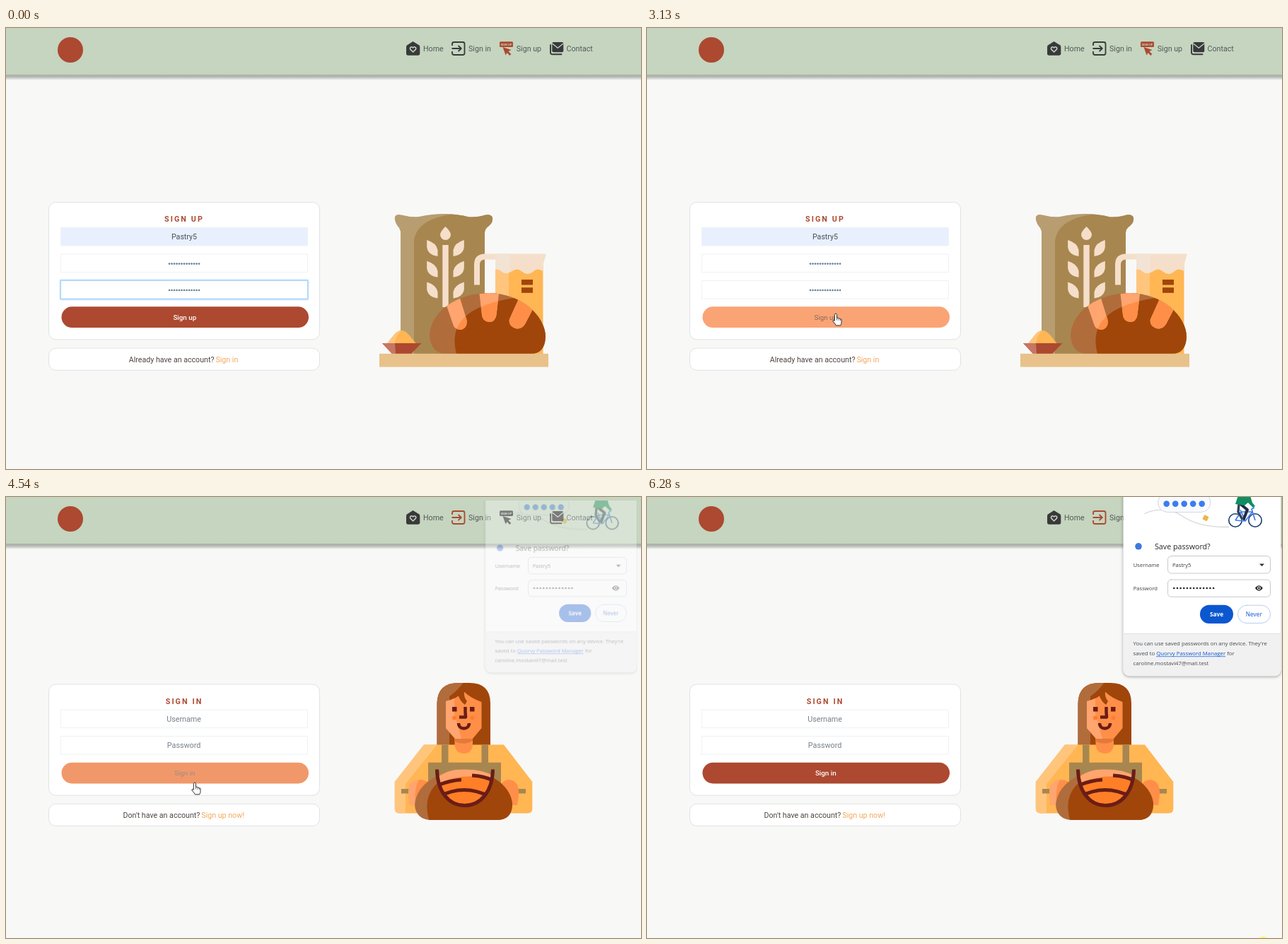
Write an HTML page with a canvas that moves like this. It is 898 px wide and 624 px high and loops after 6.35 s.

```html
<!DOCTYPE html>
<html lang="en">
<head>
<meta charset="utf-8">
<title>Sign up and sign in</title>
<style>
html, body { margin: 0; width: 100%; height: 100%; overflow: hidden; background: #f8f8f7; }
canvas { display: block; width: 898px; height: 624px; }
</style>
</head>
<body>
<canvas id="stage" width="898" height="624"></canvas>
<script>
const W = 898, H = 624, LOOP = 6350, TICK = 200 / 3;
const stage = document.getElementById('stage').getContext('2d');
const layer = document.createElement('canvas');
layer.width = W;
layer.height = H;
const popupCtx = layer.getContext('2d');
let c = stage;

const RUST = '#ac4930', INK = '#39393b', SAGE = '#c5d5bf', CREAM = '#f5dfca';
const CRUST = '#a0460a', CRUST_LIGHT = '#b16c3c', SACK = '#a8864f', SACK_LIGHT = '#b79d70';
const HONEY = '#ffb653', HONEY_LIGHT = '#ffc57d', SKIN = '#ff8f48', SKIN_LIGHT = '#ffa56f';
const MAROON = '#6a1d17', BLUE = '#0b57d0';
const SITE = 'Roboto, sans-serif', SYSTEM = '"Open Sans", sans-serif';
const USER = 'Pastry5';

// ---------- helpers ----------
function fill(color, d) {
  c.fillStyle = color;
  c.fill(new Path2D(d));
}

function line(color, width, d, cap = 'butt') {
  c.strokeStyle = color;
  c.lineWidth = width;
  c.lineCap = cap;
  c.lineJoin = 'round';
  c.stroke(new Path2D(d));
}

function box(x, y, w, h, r, color, border, width = 1) {
  c.beginPath();
  c.roundRect(x, y, w, h, r);
  if (color) { c.fillStyle = color; c.fill(); }
  if (border) { c.strokeStyle = border; c.lineWidth = width; c.stroke(); }
}

function disc(x, y, r, color) {
  c.beginPath();
  c.arc(x, y, r, 0, 7);
  c.fillStyle = color;
  c.fill();
}

function clipped(d, draw) {
  c.save();
  c.clip(new Path2D(d));
  draw();
  c.restore();
}

function text(str, x, y, size, color, { align = 'left', weight = 400, font = SITE, gap = 0 } = {}) {
  c.font = `${weight} ${size}px ${font}`;
  c.letterSpacing = gap + 'px';
  c.textAlign = align;
  c.fillStyle = color;
  c.fillText(str, x, y);
  return c.measureText(str).width;
}

function dots(x, y, pitch, r, color) {
  for (let i = 0; i < 13; i++) disc(x + i * pitch, y, r, color);
}

// Piecewise linear track of [tick, ...values]
function track(keys, n) {
  if (n <= keys[0][0]) return keys[0].slice(1);
  for (let i = 1; i < keys.length; i++) {
    const a = keys[i - 1], b = keys[i];
    if (n <= b[0]) {
      const k = (n - a[0]) / (b[0] - a[0]);
      return a.slice(1).map((v, j) => v + (b[j + 1] - v) * k);
    }
  }
  return keys[keys.length - 1].slice(1);
}

const mix = (a, b, k) => `rgb(${a.map((v, i) => Math.round(v + (b[i] - v) * k))})`;

// ---------- header ----------
function header(signIn) {
  const g = c.createLinearGradient(0, 66, 0, 74);
  g.addColorStop(0, '#a8b0a5');
  g.addColorStop(0.4, '#b4b8b2');
  g.addColorStop(1, '#f8f8f7');
  c.fillStyle = g;
  c.fillRect(0, 66, W, 8);
  c.fillStyle = SAGE;
  c.fillRect(0, 0, W, 66);
  disc(91, 31, 18, RUST);

  fill(INK, 'M575.5 19L584 24.3Q585.3 25.2 585.3 27V36Q585.3 38.7 582.6 38.7H568.6Q566 38.7 566 36V27Q566 25.2 567.3 24.3Z');
  line(SAGE, 1.5, 'M575.6 34L572 30.4C570 28 573.5 25.3 575.6 28C577.7 25.3 581.2 28 579.2 30.4Z');

  line(signIn ? RUST : INK, 1.8, 'M631 25V22.5Q631 20 633.5 20H646Q648.5 20 648.5 22.5V35.5Q648.5 38 646 38H633.5Q631 38 631 35.5V33M630.5 29H643.5M639.5 24.8L643.8 29L639.5 33.2');

  const up = signIn ? INK : RUST;
  box(698, 19.3, 19, 7.6, 1.5, up);
  text('SIGN UP', 707.5, 24.9, 4.2, SAGE, { align: 'center', weight: 700 });
  fill(up, 'M702.5 27L714.5 31L710.5 33L714.3 37L712.2 39L708.6 35L706.6 38.6Z');

  line(INK, 1.9, 'M770 24V34.5Q770 37.3 772.8 37.3H785.5', 'round');
  box(772.3, 20, 16, 14.3, 2, INK);
  line(SAGE, 1.3, 'M772.5 22L780.3 28.3L788 22');

  [['Home', 590], ['Sign in', 654], ['Sign up', 721.8], ['Contact', 792.6]]
    .forEach(([s, x]) => text(s, x, 33.4, 10.65, '#55595a'));
}

// ---------- forms ----------
function input(y, color = '#fff', focus) {
  if (focus) box(76.7, y - 0.5, 350.6, 27.6, 1, null, '#c3e0fd', 2.2);
  box(77.5, y + 0.5, 349, 25.5, 0, color, focus ? '#a9d3fb' : '#eef1f4');
}

function button(label, y, hover, ring, dip) {
  if (ring) box(77.4, y - 1.1, 351.6, 31.9, 16, null, `rgba(38,143,255,${ring})`, 2.2);
  const hot = dip ? [250, 164, 117] : [255, 168, 118];
  box(78.5, y, 349.5, 29.7, 14.8, mix([172, 73, 48], hot, hover));
  const ink = mix([255, 255, 255], [132, 105, 92], Math.max(0, hover * 1.3 - 0.3));
  text(label, 252.8, y + 18.5, 9.8, ink, { align: 'center', weight: hover < 0.5 ? 500 : 400 });
}

function cards(top, height, title, footTop) {
  box(60.5, top, 383, height, 10, '#fff', '#dfe2e4');
  box(60.5, footTop, 383, 31.3, 10, '#fff', '#dfe2e4');
  text(title, 252, top + 27.6, 10.7, RUST, { align: 'center', weight: 700, gap: 2.1 });
}

function footLine(x, y, question, link) {
  const w = text(question, x, y, 10.65, '#4c4440');
  text(link, x + w + 2, y, 10.65, '#f4a75c');
}

function signUpPage(n) {
  cards(246.5, 194.3, 'SIGN UP', 453);
  input(282, '#e8f0fe');
  input(319.5);
  input(357, '#fff', n === 0);
  text(USER, 252, 299.2, 10.65, '#4b4f55', { align: 'center' });
  dots(231, 333.6, 3.5, 1.35, '#6b8296');
  dots(231, 371, 3.5, 1.35, '#6b8296');
  const [hover] = track([[12, 0], [13, 0.35], [14, 0.85], [15, 1]], n);
  const [ring] = track([[47, 0], [49, 0.35]], n);
  button('Sign up', 394.3, hover, ring, n === 47 || n === 48);
  footLine(173.8, 472.8, 'Already have an account?', 'Sign in');
  bakery();
}

function signInPage(n) {
  cards(265, 157.2, 'SIGN IN', 434.2);
  input(300.6);
  input(338);
  text('Username', 251.6, 318, 10.75, '#75808a', { align: 'center' });
  text('Password', 251.6, 355.4, 10.75, '#75808a', { align: 'center' });
  const [hover] = track([[66, 0.26], [68, 0.83], [70, 1], [76, 1], [79, 0]], n);
  button('Sign in', 375.7, hover);
  footLine(165.5, 454, "Don't have an account?", 'Sign up now!');
  if (n > 66) baker();
}

// ---------- illustrations ----------
function sack() {
  const body = 'M558 461V288Q557 283 553 279Q549 272 550 267Q552 263 559 264.5Q572 268 584 267Q602 263 620 263Q638 263 655 267.5Q668 268 678 264.5Q686 263 688 268Q689 275 683 280Q677 284 677 290V461Z';
  fill(SACK_LIGHT, body);
  clipped(body, () => fill(SACK, 'M577 461V305C577 282 596 268 634 263V255H700V461Z'));
  fill(CREAM, 'M621.5 281Q629 288 629 292.5A7.5 7.5 0 0 1 614 292.5Q614 288 621.5 281Z');
  c.fillStyle = CREAM;
  c.fillRect(617.3, 307, 8.4, 88);
  for (const y of [300, 329.7, 359.4]) {
    for (const side of [-1, 1]) {
      c.save();
      c.translate(621.5, y);
      c.scale(side, 1);
      fill(CREAM, 'M26.3 0V10Q25 21 11 23V14Q13 4 26.3 0Z');
      c.restore();
    }
  }
}

function jug() {
  line(CREAM, 8, 'M666 363.5V335Q666 323.6 678 323.6H693');
  c.fillStyle = HONEY_LIGHT;
  c.fillRect(692, 335, 67.3, 126);
  fill(HONEY, 'M711 335H759.3V461H711Z');
  fill(CREAM, 'M692 319.5H764L759.3 336V344Q752 339 746 344Q738 352 729 344Q723 339 716 344Q706 351 699 343Q695 340 692 342Z');
  fill('#f2e3d5', 'M692 319.5H712V346Q705 348 699 343Q695 340 692 342Z');
  c.fillStyle = CRUST;
  c.fillRect(729, 356, 16, 7.5);
  c.fillRect(729, 367.2, 16, 7.6);
}

function loaf() {
  const body = 'M599 434C601 401 638 375 683 375C727 375 763 407 763 437Q762 461 742 461H619Q600 458 599 434Z';
  const shade = 'M637 461C627 422 645 394 718 382L770 375V461Z';
  const cuts = 'M621 387Q631 382 641 379L651.5 413Q653 424 644 427Q634 427 632 419ZM669.5 376Q683 374 697 376L693.5 406Q692 416 683 416Q674 415 673 406ZM726 381Q738 387 746 396L734 419Q729 427 720 425Q710 421 712 412Z';
  fill(CRUST_LIGHT, body);
  clipped(body, () => {
    fill(CRUST, shade);
    fill(SKIN_LIGHT, cuts);
    clipped(shade, () => fill(SKIN, cuts));
  });
}

function bakery() {
  sack();
  jug();
  loaf();
  fill(HONEY, 'M539 446.5C549 434 552 428 559 428C567 428 571 436 580 446.5Z');
  fill(HONEY_LIGHT, 'M539 446.5C549 434 552 428 559 428Q551 435 550 446.5Z');
  fill(RUST, 'M532 446H587.5L573 461H546Z');
  fill('#c77564', 'M532 446H550L551 461H546Z');
  c.fillStyle = '#e8c28a';
  c.fillRect(528, 460.8, 239, 18.8);
}

function baker() {
  const hair = 'M609.5 351V292Q610 263 640 263H655Q685 263 685 292V351Z';
  fill(CRUST, hair);
  clipped(hair, () => fill(CRUST_LIGHT, 'M600 255H651Q644 270 627 282V351H600Z'));

  const shirt = 'M591 350.5H704L744.3 403V441Q744 447.5 738 447.5H556Q550 447 549.8 441V403Z';
  fill(HONEY, shirt);
  clipped(shirt, () => fill(HONEY_LIGHT, 'M585 350H610L565 406V448H545V400Z'));
  c.fillStyle = SACK;
  c.fillRect(616, 350.5, 9.5, 27);
  c.fillRect(672.5, 350.5, 9.5, 27);
  c.fillRect(597, 375.7, 103, 60);
  c.fillRect(559, 413, 18, 6.5);
  c.fillRect(720, 413, 15, 6.5);

  fill(SKIN, 'M634.5 335H660V350Q659 363 647 363Q635 362 634.5 350Z');
  fill('#e27a38', 'M634.5 341H660V345Q648 352 634.5 346Z');
  const face = 'M622 289Q639 285 647 275Q658 285 672.5 290V327L660 342H635L622 327Z';
  fill(SKIN, face);
  clipped(face, () => fill(SKIN_LIGHT, 'M615 270H634V306L644 342H615Z'));
  fill(CRUST, 'M645 270L639 279Q642 289 649 294L652 289Q647 283 648 275Z');
  c.fillStyle = MAROON;
  c.fillRect(631, 297, 6.5, 6.5);
  c.fillRect(656, 297, 6.5, 6.5);
  disc(634, 312.5, 3, '#ff7d2c');
  disc(659.5, 312.5, 3, '#ff7d2c');
  line(MAROON, 4.5, 'M649.5 297V304L650 311.5H641');
  line(MAROON, 4.5, 'M640 320C640 330 655 330 655 320');

  fill(SKIN, 'M569 421Q568 401 586 400Q602 401 602 417L590 436H571Z');
  fill(SKIN_LIGHT, 'M569 421Q568 401 584 400Q577 412 579 436H571Z');
  fill(SKIN, 'M725 421Q726 401 711 400Q698 401 698 417L708 436H723Z');

  const bread = 'M578 436C580 407 610 387 648 387C688 387 716 412 716 436Q715 457 694 457H600Q580 456 578 436Z';
  fill(CRUST_LIGHT, bread);
  clipped(bread, () => fill(CRUST, 'M598 457Q587 416 622 396Q650 382 720 387V457Z'));

  const score = 'M609.5 385.5C610 417 626 436.5 648.5 436.5C671 436.5 688 417 688.5 385.5';
  clipped(score + 'Z', () => {
    fill('#ff7f27', bread);
    fill(SKIN_LIGHT, 'M605 402Q620 385 649 385Q675 386 690 395V402Q650 386 605 408Z');
    line(MAROON, 5, 'M610 408Q628 401 644 400M659 394Q678 395 690 402M612 424Q648 405 684 424');
  });
  line(MAROON, 5, score);
}

// ---------- password popup ----------
function cyclist() {
  const navy = '#173a6d';
  line('#d5d8dc', 1.4, 'M703 24C722 14 744 18 757 27C774 39 795 43 823 42.5');
  box(722.5, -6, 74.5, 27.5, 13.7, '#f8fafd', '#d3d8df');
  for (let i = 0; i < 5; i++) disc(734.7 + i * 12.5, 9.6, 4.3, '#3b7ded');
  c.save();
  c.translate(790, 29.8);
  c.rotate(0.45);
  box(-3.5, -3.5, 7, 7, 1, '#e8b848');
  c.restore();
  for (const x of [832, 860]) {
    c.beginPath();
    c.arc(x, 33, 9.2, 0, 7);
    c.strokeStyle = navy;
    c.lineWidth = 1.6;
    c.stroke();
  }
  line('#3b7ded', 1.7, 'M832 33L840 21H856L846 34L832 33M846 34L839 18M860 33L855 17L859 15');
  line('#1f2a44', 4, 'M838 9L849 18L844 31', 'round');
  line('#35415c', 3.4, 'M837 11L836 21L841 30', 'round');
  fill('#0f8f61', 'M836 -2H853L856 8L860 13L857 15L850 8L845 12L832 10Z');
}

function popup() {
  c = popupCtx;
  c.clearRect(0, 0, W, H);
  const sys = { font: SYSTEM };
  c.save();
  c.shadowColor = 'rgba(0,0,0,.38)';
  c.shadowBlur = 4;
  c.shadowOffsetY = 1;
  box(673.5, -20, 223, 273.3, 9, '#fff');
  c.restore();
  box(673.5, 193, 223, 60.3, [0, 0, 9, 9], '#f1f1f2');
  line('#dfe1e3', 1, 'M673.5 193.5H896.5');
  cyclist();

  disc(695, 69.8, 4.8, '#4079df');
  text('Save password?', 718, 74, 10.7, '#26282b', { font: SYSTEM, weight: 500 });
  text('Username', 687.7, 98.8, 7.65, '#3c4043', sys);
  text('Password', 687.7, 131.8, 7.65, '#3c4043', sys);
  box(736.5, 83.5, 145, 24.5, 5, '#fff', '#c6c9cc');
  box(736.5, 117, 145, 24.3, 5, '#fff', '#c6c9cc');
  text(USER, 743, 98.8, 7.6, '#33363a', sys);
  fill('#2a2c2f', 'M866 94.5H873L869.5 98Z');
  dots(745.3, 129, 4.65, 1.35, '#2a2c2f');
  fill('#2a2c2f', 'M860 129Q865.4 121.5 870.8 129Q865.4 136.5 860 129Z');
  disc(865.4, 129, 2.4, '#fff');
  disc(865.4, 129, 1.4, '#2a2c2f');
  box(782, 152.7, 47, 26.3, 13.1, BLUE);
  text('Save', 805.5, 169.2, 8.3, '#fff', { font: SYSTEM, weight: 700, align: 'center' });
  box(835.5, 153.2, 46, 25.3, 12.6, '#fff', '#b4cff5');
  text('Never', 858.3, 169.2, 8.3, BLUE, { font: SYSTEM, weight: 500, align: 'center' });

  const grey = '#46494c';
  text("You can use saved passwords on any device. They're", 687.5, 210.4, 7.8, grey, sys);
  const x = 687.5 + text('saved to ', 687.5, 224.2, 7.8, grey, sys);
  const w = text('Quorvy Password Manager', x, 224.2, 7.8, BLUE, sys);
  line(BLUE, 0.7, `M${x} 225.7h${w}`);
  text(' for', x + w, 224.2, 7.8, grey, sys);
  text('caroline.mostavi47@mail.test', 687.5, 238, 7.8, grey, sys);
  c = stage;
}

function showPopup(n) {
  const [alpha, scale] = track([[66, 0, 0.94], [67, 0.12, 0.945], [68, 0.34, 0.96], [69, 0.65, 0.98], [70, 0.9, 0.994], [71, 1, 1]], n);
  if (!alpha) return;
  popup();
  c.save();
  c.globalAlpha = alpha;
  c.translate(785, 128);
  c.scale(scale, scale);
  c.drawImage(layer, -785, -128);
  c.restore();
}

// ---------- pointer ----------
const PATH = [
  [5, 730, 610], [7, 600, 520], [9, 430, 420], [11, 320, 366], [13, 274, 393], [14, 267, 404.5],
  [74, 267, 404.5], [75, 330, 395], [76, 472.5, 369.5], [78, 650, 280], [80, 780, 185],
  [82, 838, 139], [84, 850, 164], [86, 857, 200], [90, 875, 440], [93, 886, 628]
];
const HAND = 'M-1.7 1Q-1.5 -.3 0 -.3Q1.4 -.2 1.5 1V6Q3.5 5 4 6.6Q6 5.8 6.3 7.4Q8 6.8 8 8.6V12Q8 14 6.6 16.4H.3Q-1 13.8 -4 10.6Q-4.4 8.8 -2.8 8.9L-1.7 9.9Z';
const ARROW = 'M0 0V14L3.2 11L5.3 15.8L7.4 14.9L5.3 10.2H9.8Z';

function pointer(n) {
  if (n < 5 || n > 92) return;
  const [x, y] = track(PATH, n);
  const hand = (n > 11 && n < 77) || (n > 82 && n < 86);
  c.save();
  c.translate(x, y);
  fill('#fff', hand ? HAND : ARROW);
  line('#2e2e2e', 1, hand ? HAND : ARROW);
  if (hand) line('#2e2e2e', 0.7, 'M1.5 6V9M4 6.8V9.3M6.3 7.6V9.6');
  c.restore();
}

function draw(t) {
  const n = Math.floor((t + 14) / TICK);
  const signIn = n >= 66;
  c.fillStyle = '#f8f8f7';
  c.fillRect(0, 0, W, H);
  header(signIn);
  (signIn ? signInPage : signUpPage)(n);
  showPopup(n);
  pointer(n);
  if (n > 93) disc(871.5, 629, 7.5, '#fbf77c');
}

const start = performance.now();
function loop() {
  draw((performance.now() - start) % LOOP);
  requestAnimationFrame(loop);
}
loop();
</script>
</body>
</html>
```
